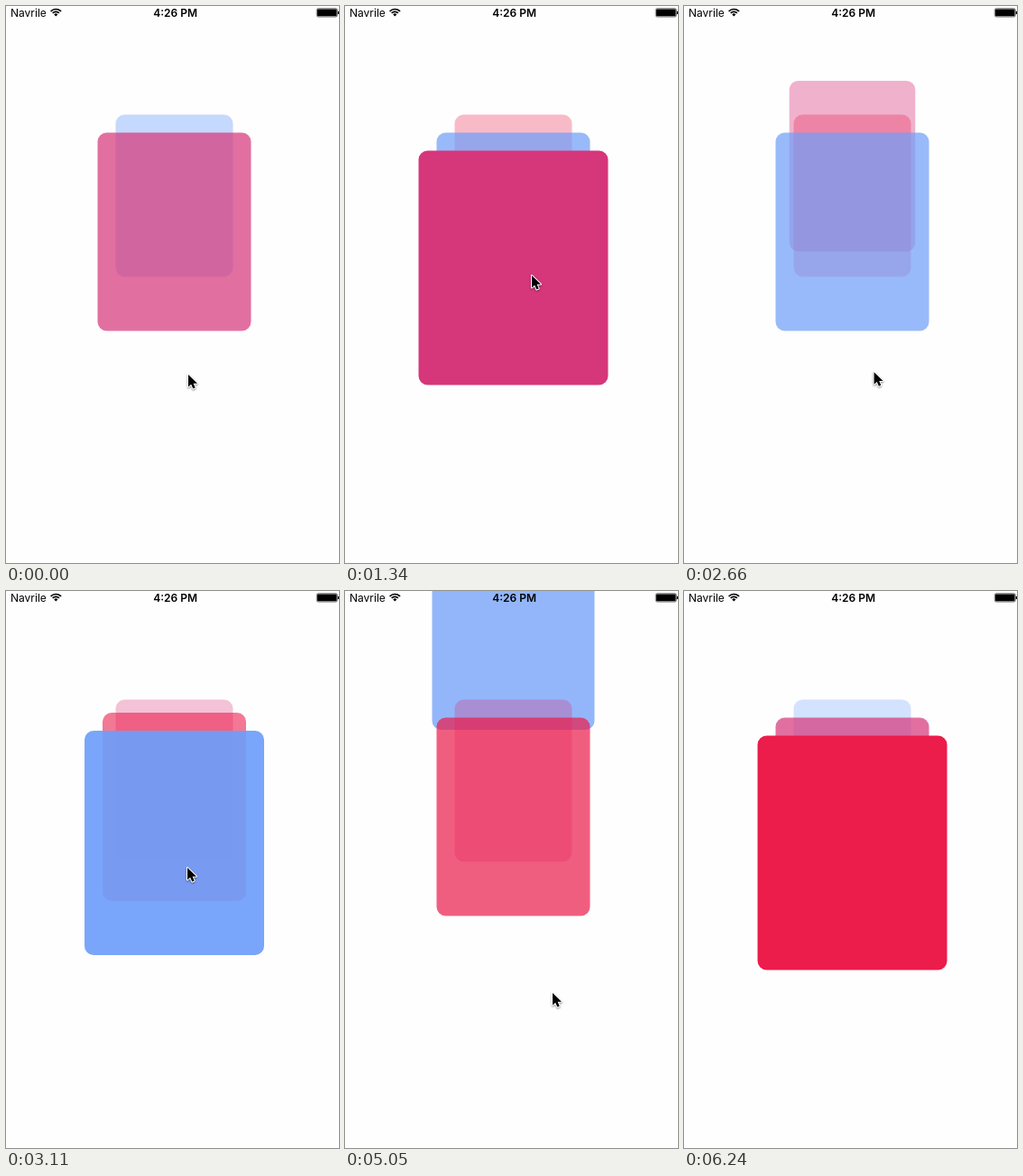
These frames come from a looping animation (369x618 px, 6670 ms). An HTML page with a canvas:

```html
<!DOCTYPE html>
<html lang="en">
<head>
<meta charset="utf-8">
<title>Card stack</title>
<style>
  html, body { margin: 0; width: 100%; height: 100%; overflow: hidden; background: #fefefe; }
  canvas { display: block; width: 369px; height: 618px; }
</style>
</head>
<body>
<canvas id="stage" width="369" height="618"></canvas>
<script>
const ctx = document.getElementById('stage').getContext('2d');
const LOOP = 6670, LAST_STEP = 42, STEP = 6240 / LAST_STEP;
const COLORS = ['#ec1c4b', '#d6367a', '#6e9efa'];
const CENTER_X = 186.5, TOP_Y = -194, EXIT_Y = 900;
const MOVE = 400, SHIFT_DELAY = 515, SHIFT = 600;

// Resting places from front to back.
const SLOTS = [
  { y: 160.5, w: 210, h: 260, a: 1 },
  { y: 140.5, w: 170, h: 220, a: 0.7 },
  { y: 120.5, w: 130, h: 180, a: 0.3 }
];

// Per swipe: when the card is grabbed, and when it re-enters from the top.
const SWIPES = [
  { grab: -700, enter: 130 },
  { grab: 1480, enter: 2212 },
  { grab: 4160, enter: 4885 },
  { grab: 1e5, enter: 1e6 }
];

// Pointer path: time, x, y.
const POINTER = [
  [-700, 200, 300], [-290, 201, 407], [0, 201, 408], [600, 203, 399],
  [1040, 206, 330], [1337, 206, 298], [1480, 207, 310], [1790, 211, 420],
  [2228, 212, 426], [2600, 209, 400], [3120, 200, 306], [3700, 190, 350],
  [4160, 185, 366], [4457, 184, 430], [4600, 192, 446], [5051, 229, 445],
  [5500, 240, 452], [5794, 286, 515], [5942, 310, 570], [6091, 323, 602],
  [6240, 340, 650]
];

const lerp = (a, b, p) => a + (b - a) * p;
const ease = (time, duration) => {
  const p = Math.min(1, Math.max(0, time / duration));
  return p * p * (3 - 2 * p);
};
const blend = (from, to, p) => ({
  y: lerp(from.y, to.y, p), w: lerp(from.w, to.w, p),
  h: lerp(from.h, to.h, p), a: lerp(from.a, to.a, p)
});

function pointerAt(t) {
  const i = Math.max(1, POINTER.findIndex(k => k[0] >= t));
  const [t0, x0, y0] = POINTER[i - 1], [t1, x1, y1] = POINTER[i];
  const p = (t - t0) / (t1 - t0);
  return { x: lerp(x0, x1, p), y: lerp(y0, y1, p) };
}

function drawCard(color, { y, w, h, a }) {
  ctx.globalAlpha = a;
  ctx.fillStyle = color;
  ctx.beginPath();
  ctx.roundRect(CENTER_X - w / 2, y, w, h, 10);
  ctx.fill();
  ctx.globalAlpha = 1;
}

function swipedPose(t, { grab, enter }) {
  const front = SLOTS[0];
  if (t >= enter) return blend({ ...front, y: TOP_Y }, SLOTS[2], ease(t - enter, MOVE));
  if (t < grab) return front;
  const release = enter - MOVE - 25;
  const drag = pointerAt(Math.min(t, release)).y - pointerAt(grab).y;
  return { ...front, y: lerp(front.y + drag, EXIT_Y, ease(t - release, MOVE)) };
}

function drawCards(t) {
  const cycle = SWIPES.findIndex(s => t < s.enter + SHIFT_DELAY + SHIFT);
  const swipe = SWIPES[cycle];
  const shift = ease(t - swipe.enter - SHIFT_DELAY, SHIFT);
  const back = cycle === 0 ? { ...SLOTS[2], a: 0.4 } : SLOTS[2];
  const color = n => COLORS[(cycle + n) % 3];
  const cards = [
    [color(2), blend(back, SLOTS[1], shift)],
    [color(1), blend(SLOTS[1], SLOTS[0], shift)]
  ];
  const swiped = [color(0), swipedPose(t, swipe)];
  if (t >= swipe.enter) cards.unshift(swiped);
  else cards.push(swiped);
  cards.forEach(card => drawCard(...card));
}

function drawStatusBar() {
  ctx.fillStyle = ctx.strokeStyle = '#000';
  ctx.textBaseline = 'alphabetic';
  ctx.textAlign = 'left';
  ctx.font = '12px Inter, sans-serif';
  ctx.fillText('Navrile', 5, 11.5);
  ctx.textAlign = 'center';
  ctx.font = '600 12px Inter, sans-serif';
  ctx.fillText('4:26 PM', 187.7, 11.5);

  ctx.lineWidth = 1.7;
  for (const r of [4.9, 7.8]) {
    ctx.beginPath();
    ctx.arc(55.3, 11.3, r, -Math.PI * 0.76, -Math.PI * 0.24);
    ctx.stroke();
  }
  ctx.beginPath();
  ctx.moveTo(55.3, 11.6);
  ctx.arc(55.3, 11.3, 2.8, -Math.PI * 0.76, -Math.PI * 0.24);
  ctx.fill();

  ctx.lineWidth = 0.6;
  ctx.beginPath();
  ctx.roundRect(344.3, 2.8, 22.9, 9.2, 1.8);
  ctx.stroke();
  ctx.beginPath();
  ctx.roundRect(345, 3.5, 21.5, 7.8, 1);
  ctx.roundRect(367.7, 5.8, 1.3, 3.2, 0.6);
  ctx.fill();
}

function drawPointer({ x, y }) {
  const arrow = new Path2D('M1 1V14.6L4.2 11.7L6.3 16.6L8.7 15.6L6.6 10.8H11Z');
  ctx.save();
  ctx.translate(x, y);
  ctx.shadowColor = 'rgba(0,0,0,.45)';
  ctx.shadowBlur = 2;
  ctx.shadowOffsetY = 1;
  ctx.strokeStyle = '#fff';
  ctx.lineWidth = 2;
  ctx.lineJoin = 'round';
  ctx.stroke(arrow);
  ctx.shadowColor = 'transparent';
  ctx.fillStyle = '#000';
  ctx.fill(arrow);
  ctx.restore();
}

function render(now) {
  const step = Math.min(LAST_STEP, Math.floor((now % LOOP + 12) / STEP));
  const t = step * STEP;
  ctx.fillStyle = '#fefefe';
  ctx.fillRect(0, 0, 369, 618);
  drawCards(t);
  drawStatusBar();
  drawPointer(pointerAt(Math.min(t, 6240)));
}

const start = performance.now();
function tick() {
  render(performance.now() - start);
  requestAnimationFrame(tick);
}
tick();
</script>
</body>
</html>
```
